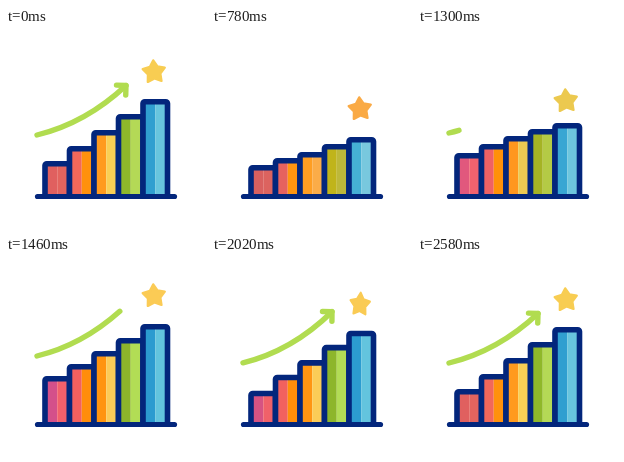
An HTML page with a canvas that plays this animation: 200 px wide and 200 px high, repeating every 2800 ms.

```html
<!DOCTYPE html>
<html lang="en">
<head>
<meta charset="utf-8">
<title>Growth chart</title>
<style>
html, body { margin: 0; width: 100%; height: 100%; overflow: hidden; background: #fff; }
canvas { display: block; width: 200px; height: 200px; }
</style>
</head>
<body>
<canvas id="stage"></canvas>
<script>
const canvas = document.getElementById('stage');
const ctx = canvas.getContext('2d');
const ratio = window.devicePixelRatio || 1;
canvas.width = canvas.height = 200 * ratio;

const LOOP = 2800, START = 220, END = 2580, STEP = 40;
const NAVY = '#03267c', GREEN = '#b1dc50';
const REST_TOPS = [133, 118, 102, 86, 71];

// time, extra height of the five bars, star centre y, arrow tail dy, arrow tip dy
const KEYS = [
  [180, 0, 0, 0, 0, 0, 44, 0, 0],
  [500, -4, -7, -10, -12, -13, 53, 4, 9],
  [780, -4, -12, -22, -30, -38, 81, 10, 20],
  [960, -6, -17, -29, -41, -51, 97, 10, 24],
  [1140, -1, -12, -23, -35, -45, 92, 6, 18],
  [1300, 8, 2, -6, -15, -24, 73, -2, 5],
  [1460, 13, 10, 7, 4, 3, 40, -7, -8],
  [1640, 15, 14, 12, 12, 13, 25, -11, -17],
  [1780, 12, 12, 11, 12, 15, 23, -11, -20],
  [1900, 4, 6, 7, 8, 9, 33, -6, -12],
  [2100, -4, -4, -7, -9, -11, 57, 3, 4],
  [2260, -2, -3, -7, -10, -13, 60, 5, 8],
  [2580, 0, 0, 0, 0, 0, 44, 0, 0]
];

// left and right half of each bar, then the star
const palette = text => text.split(' ').map(hex =>
  [0, 2, 4].map(i => parseInt(hex.slice(i, i + 2), 16)));
const rest = palette('e0605f e3645e f2685a ff910c ff9a1e f9cf55 8fb82a b4d956 309fd0 68c5de f8cd52');
const low = palette('d9605f dc635f e6625f ff9510 ff9e22 fbac48 c0b41a bdb83a 45b0d5 78c8de faaa45');
const rising = palette('ee6070 f06370 ee6468 ff9408 ff9a2c dcc84c bdb01c b5b634 45b0d5 78c8de dcc648');
const high = palette('d4508a f3606b f2605f ff8d0a ff940f fbcb57 8db52b b2dd55 2b9bd0 62c4de fbcb55');
const TINTS = [[180, rest], [780, low], [1140, rising], [1460, high], [1900, high], [2580, rest]];

const clamp = x => Math.max(0, Math.min(1, x));
const progress = (t, from, to) => clamp((t - from) / (to - from));
const smooth = p => p * p * (3 - 2 * p);
const mix = (a, b, p) => a + (b - a) * p;

function segment(keys, t) {
  let i = 0;
  while (i < keys.length - 2 && t >= keys[i + 1][0]) i++;
  return i;
}

function slope(i, c) {
  if (i === 0 || i === KEYS.length - 1) return 0;
  const a = KEYS[i - 1], b = KEYS[i + 1];
  return (b[c] - a[c]) / (b[0] - a[0]);
}

function valueAt(t, c) {
  const i = segment(KEYS, t), a = KEYS[i], b = KEYS[i + 1];
  const span = b[0] - a[0], p = progress(t, a[0], b[0]);
  return mix(a[c], b[c], smooth(p))
    + span * p * (1 - p) * ((1 - p) * slope(i, c) - p * slope(i + 1, c));
}

function coloursAt(t) {
  const i = segment(TINTS, t), [t0, from] = TINTS[i], [t1, to] = TINTS[i + 1];
  const p = progress(t, t0, t1);
  return from.map((rgb, n) => `rgb(${rgb.map((v, k) => Math.round(mix(v, to[n][k], p)))})`);
}

function stroke(colour, width) {
  ctx.strokeStyle = colour;
  ctx.lineWidth = width;
  ctx.stroke();
}

function drawBar(i, top, left, right) {
  const x = 39 + i * 24.5, w = 24.5, y = top + 2.8, r = 1.8;
  ctx.fillStyle = left;
  ctx.fillRect(x, y, w / 2, 168 - y);
  ctx.fillStyle = right;
  ctx.fillRect(x + w / 2, y, w / 2, 168 - y);
  ctx.beginPath();
  ctx.moveTo(x, 168);
  ctx.arcTo(x, y, x + r, y, r);
  ctx.arcTo(x + w, y, x + w, y + r, r);
  ctx.lineTo(x + w, 168);
  stroke(NAVY, 5.6);
}

function drawArrow(t, tailDy, tipDy) {
  const shown = t < 1000 ? 1 - smooth(progress(t, 220, 660)) : progress(t, 1280, 1475);
  if (shown <= 0) return;
  const x0 = 31, y0 = 107 + tailDy, cx = 80, cy = y0 - 12, x1 = 120, y1 = 57.5 + tipDy;
  ctx.beginPath();
  ctx.moveTo(x0, y0);
  // the leading part of a quadratic curve is again a quadratic curve
  const ax = mix(x0, cx, shown), ay = mix(y0, cy, shown);
  ctx.quadraticCurveTo(ax, ay,
    mix(ax, mix(cx, x1, shown), shown), mix(ay, mix(cy, y1, shown), shown));
  stroke(GREEN, 5.4);

  const head = t < 1000 ? 1 - progress(t, 220, 340) : progress(t, 1460, 1580);
  if (head <= 0) return;
  const angle = Math.atan2(y1 - cy, x1 - cx), arm = 9.5 * head;
  ctx.beginPath();
  [-1, 0, 1].forEach(side => {
    const a = angle + Math.PI + side * 0.79, d = side ? arm : 0;
    ctx.lineTo(x1 + d * Math.cos(a), y1 + d * Math.sin(a));
  });
  stroke(GREEN, 5.4);
}

function drawStar(t, y, colour) {
  const turn = smooth(progress(t, 1600, 2540)) * Math.PI * 2;
  ctx.save();
  ctx.translate(148, y);
  ctx.scale(Math.cos(turn), 1);
  ctx.rotate(-0.07);
  ctx.beginPath();
  for (let i = 0; i < 10; i++) {
    const r = i % 2 ? 6.5 : 11.6, a = i * Math.PI / 5 - Math.PI / 2;
    ctx.lineTo(r * Math.cos(a), r * Math.sin(a));
  }
  ctx.closePath();
  ctx.fillStyle = colour;
  ctx.fill();
  stroke(colour, 2.4);
  ctx.restore();
}

function draw(time) {
  const t = time < START ? 180
    : Math.min(END, START + Math.floor((time - START) / STEP) * STEP);
  const colours = coloursAt(t);
  ctx.setTransform(ratio, 0, 0, ratio, 0, 0);
  ctx.fillStyle = '#fff';
  ctx.fillRect(0, 0, 200, 200);
  ctx.lineCap = ctx.lineJoin = 'round';

  drawArrow(t, valueAt(t, 7), valueAt(t, 8));
  REST_TOPS.forEach((top, i) =>
    drawBar(i, top - valueAt(t, i + 1), colours[2 * i], colours[2 * i + 1]));
  ctx.beginPath();
  ctx.moveTo(31.5, 168.5);
  ctx.lineTo(168.5, 168.5);
  stroke(NAVY, 5.2);
  drawStar(t, valueAt(t, 6), colours[10]);
}

const begin = performance.now();
function tick() {
  draw((performance.now() - begin) % LOOP);
  requestAnimationFrame(tick);
}
tick();
</script>
</body>
</html>
```
